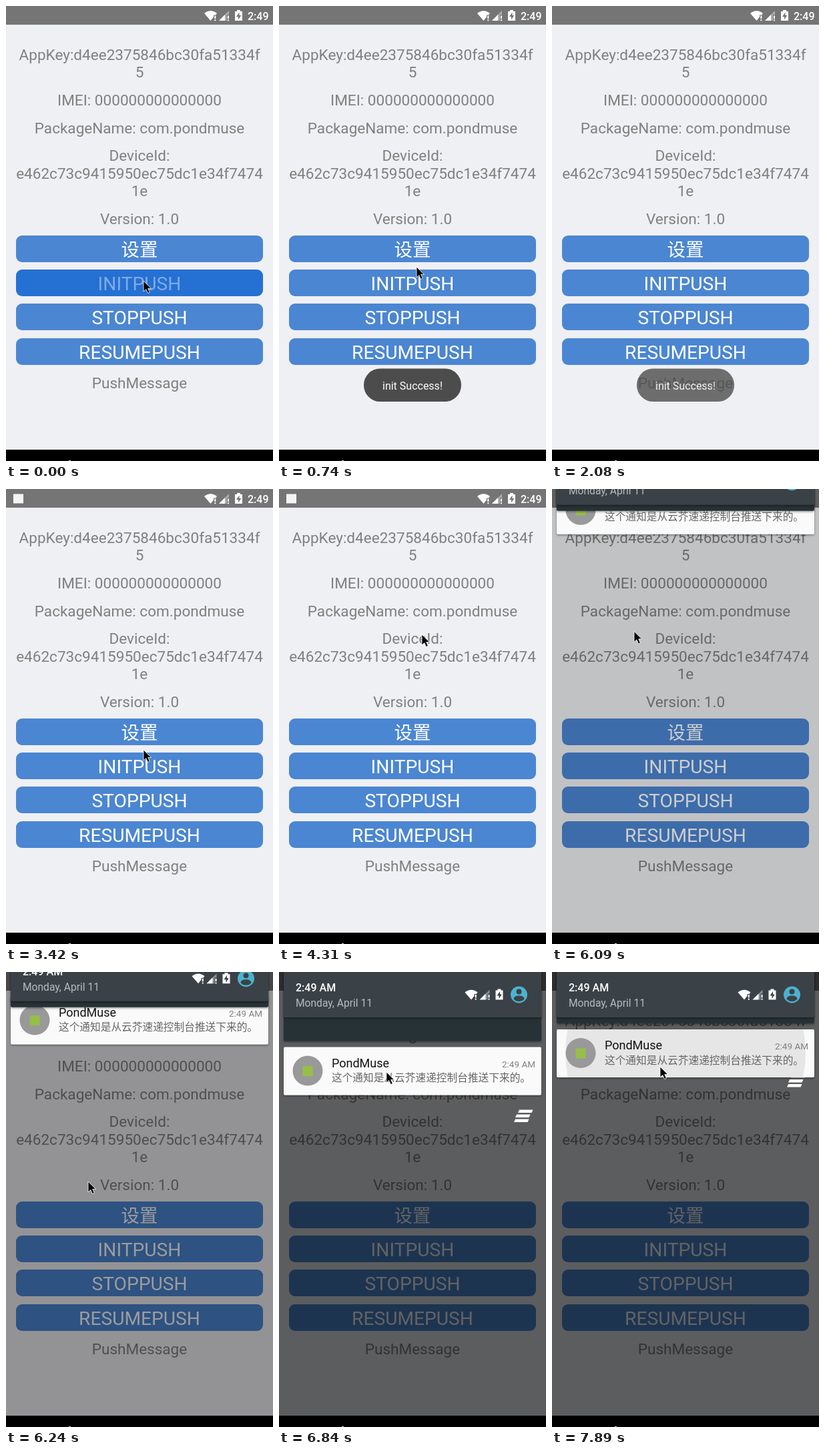
Recreate the animation shown at these times as an HTML page. Size 400 px wide and 682 px high, loop 8 s.

```html
<!DOCTYPE html>
<html lang="en">
<head>
<meta charset="utf-8">
<title>Push notification demo</title>
<style>
  html, body { margin: 0; width: 100%; height: 100%; overflow: hidden; background: #000; }
  svg { display: block; width: 100vw; height: 100vh; font-family: Roboto, "Noto Sans CJK SC", "Noto Sans CJK", sans-serif; }
  .info { font-size: 22.55px; fill: #808080; text-anchor: middle; }
  .label { font-size: 28.2px; fill: #fff; text-anchor: middle; }
  .cjk { font-size: 27.5px; font-family: "Noto Sans CJK SC", "Noto Sans CJK", sans-serif; }
  .clock { font-size: 16px; font-weight: 500; fill: #fff; }
</style>
</head>
<body>
<svg viewBox="0 0 400 682" preserveAspectRatio="none">
  <defs>
    <g id="signals" fill="#fff">
      <path d="M297 11Q306.500 3.500 316 11L314 13.500H311V16.500L306.500 22Z"/>
      <path d="M312.300 14.500h2v4.500h-2zM312.300 20.200h2v2h-2z"/>
      <path d="M319 22L334 7V13H331V22Z" opacity=".4"/>
      <path d="M319 22L328 13V22ZM332 14.500h2v4.500h-2zM332 20.200h2v2h-2z"/>
      <path fill-rule="evenodd" d="M346 6h5v2h3v14h-11v-14h3zM349.500 9.500L345 16h3v4.500L352.300 14h-2.800z"/>
    </g>
    <filter id="shadow" x="-5%" y="-20%" width="110%" height="150%">
      <feDropShadow dx="0" dy="1.500" stdDeviation="1.500" flood-opacity=".4"/>
    </filter>
    <clipPath id="cardClip"><rect x="7" y="86" width="386" height="72" rx="2"/></clipPath>
    <clipPath id="screenClip"><rect width="400" height="665"/></clipPath>
  </defs>

  <g clip-path="url(#screenClip)">
    <rect width="400" height="665" fill="#eff0f3"/>
    <rect width="400" height="28" fill="#757575"/>
    <rect id="note" x="11" y="7.500" width="15" height="14" fill="#f4f4f4"/>
    <use href="#signals"/>
    <text class="clock" x="362" y="21">2:49</text>
    <g id="page"></g>

    <g id="toast">
      <rect x="127" y="543.500" width="146" height="49.500" rx="24.500" fill="#4c4c4c"/>
      <text x="200" y="575" font-size="16" fill="#fff" text-anchor="middle">init Success!</text>
    </g>

    <rect id="dim" width="400" height="665"/>

    <path id="clear" fill="#fff" d="M360 180h20.500l-2 4.500h-20.500zM356 187h20.500l-2 4.500h-20.500zM354 194h20.500l-2 4.500h-20.500z"/>

    <g id="card">
      <rect x="7" y="86" width="386" height="72" rx="2" fill="#fafafa" filter="url(#shadow)"/>
      <circle id="ripple" cy="121" fill="#000" opacity=".08" clip-path="url(#cardClip)"/>
      <circle cx="43" cy="121.500" r="22.500" fill="#999"/>
      <rect x="35.500" y="114.500" width="15" height="15" fill="#95bf47"/>
      <text x="79" y="116" font-size="18" fill="#111">PondMuse</text>
      <text x="384" y="116" font-size="13.500" fill="#808080" text-anchor="end">2:49 AM</text>
      <text x="79" y="137.500" font-size="15.700" fill="#666">这个通知是从云芥速递控制台推送下来的。</text>
    </g>

    <g id="shade">
      <rect id="tray" x="7" y="0" width="386" rx="2" fill="#283036" filter="url(#shadow)"/>
      <rect x="7" y="-30" width="386" height="98" rx="2" fill="#3a4246" filter="url(#shadow)"/>
      <text class="clock" x="25" y="29">2:49 AM</text>
      <text x="25" y="52" font-size="15.600" fill="#b7bcbe">Monday, April 11</text>
      <use href="#signals" x="-18.500" y="19.500"/>
      <circle cx="359.500" cy="34" r="12.500" fill="#4db2cf"/>
      <circle cx="359.500" cy="29.500" r="4" fill="#3a4246"/>
      <path d="M351.500 40.500Q352 35.500 359.500 35.500T367.500 40.500Q364.500 44 359.500 44T351.500 40.500Z" fill="#3a4246"/>
    </g>
  </g>

  <rect y="665" width="400" height="17"/>
  <rect x="94" y="681" width="3" height="1" fill="#ddd"/>
  <path id="cursor" d="M0 0V16L3.800 12.500L6.500 18.500L9.300 17.200L6.700 11.400H11.500Z" stroke="#fff" stroke-width=".8"/>
</svg>

<script>
const LOOP = 8000, START = 283, TICK = 148.8;
const $ = id => document.getElementById(id);

// Paragraphs, each a list of wrapped lines.
const paragraphs = [
  ["AppKey:d4ee2375846bc30fa51334f", "5"],
  ["IMEI: 000000000000000"],
  ["PackageName: com.pondmuse"],
  ["DeviceId:", "e462c73c9415950ec75dc1e34f7474", "1e"],
  ["Version: 1.0"]
];
const buttons = ["设置", "INITPUSH", "STOPPUSH", "RESUMEPUSH"];

const info = (s, y) => `<text class="info" x="200" y="${y}">${s}</text>`;
const button = (s, i) => {
  const y = Math.round(344 + i * 51.2);
  return `<g class="button"><rect x="15" y="${y}" width="370" height="40" rx="9" fill="#4b86d2"/>` +
    `<text class="label${i ? "" : " cjk"}" x="200" y="${y + 31}">${s}</text></g>`;
};
let html = "", baseline = 39.2;
for (const lines of paragraphs)
  lines.forEach((s, i) => html += info(s, baseline += i ? 26.6 : 41.6));
$("page").innerHTML = html + buttons.map(button).join("") + info("PushMessage", 573);
const [initBox, initLabel] = document.querySelectorAll(".button")[1].children;

const progress = (v, from, to) => Math.min(1, Math.max(0, (v - from) / (to - from)));
const smooth = p => p * p * (3 - 2 * p);
const easeOut = p => 1 - (1 - p) ** 3;
const move = (id, x, y) => $(id).setAttribute("transform", `translate(${x} ${y})`);
const fade = (id, a) => $(id).setAttribute("opacity", a);

const DRAG = [5636, 6561];
const legs = [
  { time: [283, 730], a: [206, 412], b: [206, 391], ease: smooth },
  { time: [3408, 4300], a: [326, 377], b: [214, 218], ease: easeOut },
  { time: [4598, 5342], a: [214, 218], b: [123, 8], ease: smooth },
  { time: DRAG, a: [123, 8], b: [123, 436], ease: smooth },
  { time: [6561, 6946], a: [123, 436], b: [162, 142], ease: easeOut }
];

function cursorAt(t) {
  const { time, a, b, ease } = legs.findLast(leg => t >= leg.time[0]) || legs[0];
  const p = ease(progress(t, ...time));
  return a.map((v, i) => v + (b[i] - v) * p);
}

function draw(now) {
  const t = START + TICK * Math.floor((now - START) / TICK);

  const pressed = t < START;
  initBox.setAttribute("fill", pressed ? "#2570d3" : "#4b86d2");
  initLabel.setAttribute("opacity", pressed ? .41 : 1);
  fade("toast", progress(t, 283, 729) - progress(t, 1990, 2366));

  const notified = t > 3400;
  fade("note", +notified);
  fade("cursor", +(notified || t < 800));
  move("cursor", ...cursorAt(t));

  const pull = smooth(progress(t, ...DRAG));
  const shift = -85 * (1 - pull);
  const over = 28 * Math.sin(Math.PI * progress(t, 6535, 7276));
  fade("dim", .61 * progress(pull, .25, .98));
  fade("card", progress(pull, .1, .4));
  move("card", 0, shift * 2.04 + over);
  move("shade", 0, shift);
  $("tray").setAttribute("height", 77 + over);

  fade("clear", progress(pull, .95, .99));
  move("clear", 0, over - 26 * progress(t, 7723, 7871));

  const tap = progress(t, 7575, 7871);
  $("ripple").setAttribute("cx", 162 + 38 * tap);
  $("ripple").setAttribute("r", 180 * tap);
}

const start = performance.now();
function tick() {
  draw((performance.now() - start) % LOOP);
  requestAnimationFrame(tick);
}
tick();
</script>
</body>
</html>
```
